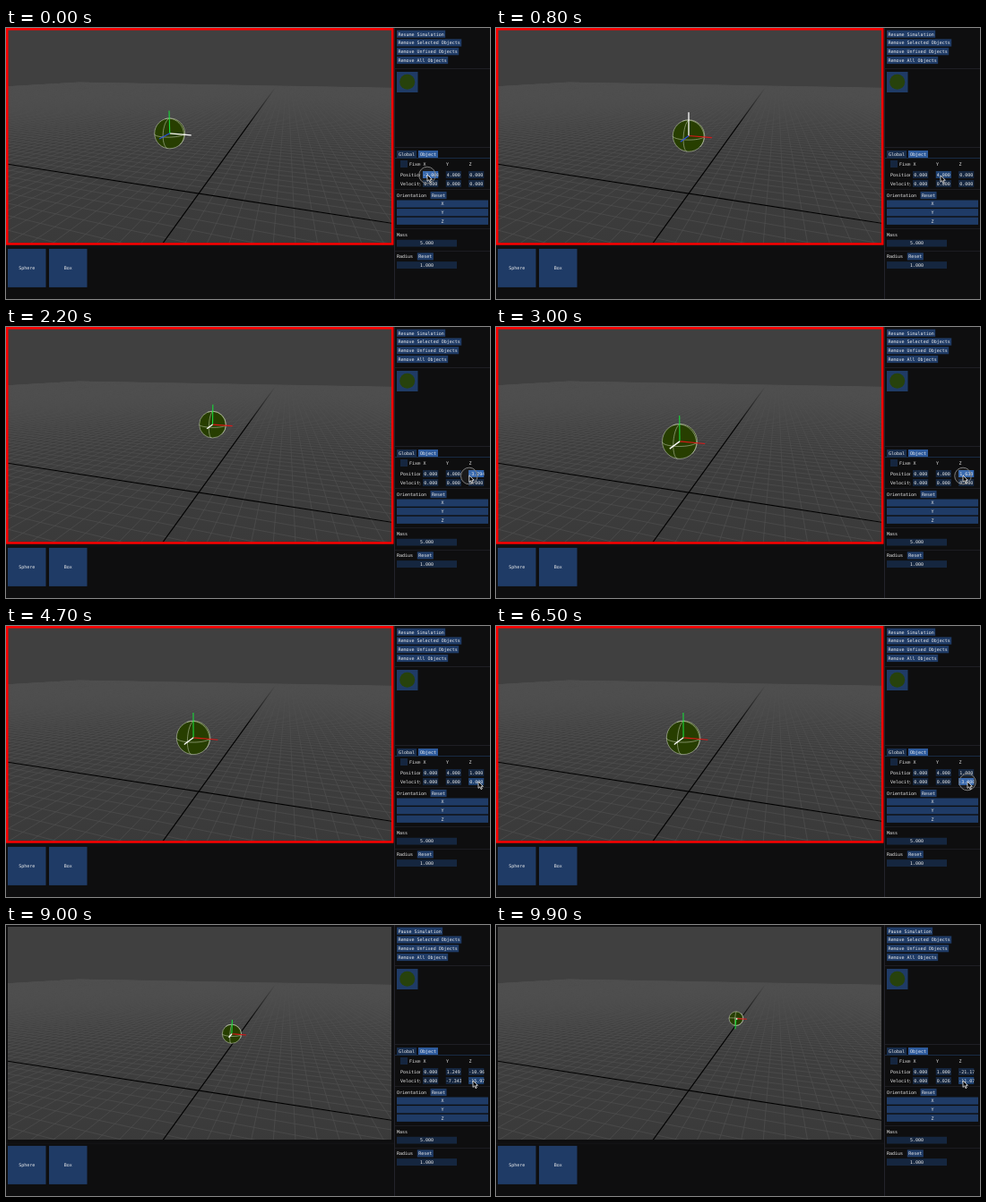
An HTML page that plays this animation: 540 by 303 pixels, repeating every 10 s.

```html
<!DOCTYPE html>
<html lang="en">
<head>
<meta charset="utf-8">
<title>Physics sandbox</title>
<style>
  html, body { margin: 0; width: 100%; height: 100%; overflow: hidden; background: #0e0e0f; }
  svg { display: block; }
  #stage { width: 100vw; height: 100vh; }
  text { font: 5px "DejaVu Sans Mono", monospace; fill: #ececec; white-space: pre; }
</style>
</head>
<body>
<svg id="stage" viewBox="0 0 540 303">
  <defs>
    <linearGradient id="floor" x1="0" y1="0" x2="0" y2="1">
      <stop offset="0" stop-color="#414141"/><stop offset="1" stop-color="#383838"/>
    </linearGradient>
    <linearGradient id="axisFade" gradientUnits="userSpaceOnUse" x1="0" y1="66" x2="0" y2="110">
      <stop offset="0" stop-color="#000" stop-opacity="0"/><stop offset="1" stop-color="#000"/>
    </linearGradient>
    <clipPath id="view"><rect x="2" y="2" width="428" height="238"/></clipPath>
  </defs>
  <g id="scene" clip-path="url(#view)"></g>
  <g id="panels"></g>
  <g id="pointer"></g>
</svg>
<script>
const NS = 'http://www.w3.org/2000/svg';
const $ = id => document.getElementById(id);
const scene = $('scene'), panels = $('panels'), pointer = $('pointer');

function add(parent, tag, attrs, content) {
  const el = document.createElementNS(NS, tag);
  set(el, attrs);
  if (content !== undefined) el.textContent = content;
  parent.appendChild(el);
  return el;
}
function set(el, attrs) {
  for (const k in attrs) el.setAttribute(k, attrs[k]);
}

// Camera at (5, 8, 15) looking at (0, 4, 0), 45 degree field of view
const EYE = [5, 8, 15], FOCAL = 288, CX = 215, CY = 120.5;
const dot = (a, b) => a[0] * b[0] + a[1] * b[1] + a[2] * b[2];
const sub = (a, b) => a.map((v, i) => v - b[i]);
const mix = (a, b, k) => a.map((v, i) => v + (b[i] - v) * k);
const unit = a => a.map(v => v / Math.hypot(...a));
const cross = (a, b) => [a[1] * b[2] - a[2] * b[1], a[2] * b[0] - a[0] * b[2], a[0] * b[1] - a[1] * b[0]];
const FWD = unit(sub([0, 4, 0], EYE));
const RIGHT = unit(cross(FWD, [0, 1, 0]));
const UP = cross(RIGHT, FWD);
const depth = p => dot(sub(p, EYE), FWD);

function project(p) {
  const q = sub(p, EYE), s = FOCAL / dot(q, FWD);
  return [CX + dot(q, RIGHT) * s, CY - dot(q, UP) * s];
}
const xy = p => project(p).map(v => v.toFixed(2)).join(' ');

function linePath(a, b) {
  const near = 1, da = depth(a), db = depth(b);
  if (da < near && db < near) return '';
  if (da < near) a = mix(a, b, (near - da) / (db - da));
  if (db < near) b = mix(b, a, (near - db) / (da - db));
  return `M${xy(a)}L${xy(b)}`;
}

// Static ground
const HALF = 130;
add(scene, 'rect', { width: 432, height: 242, fill: '#404040' });
add(scene, 'path', {
  d: `M${xy([-HALF, 0, -HALF])}L${xy([HALF, 0, -HALF])}L540 303L-200 303L${xy([-HALF, 0, -20])}Z`,
  fill: 'url(#floor)'
});
let grid = '';
for (let i = -HALF; i <= HALF; i++) {
  grid += linePath([i, 0, -HALF], [i, 0, HALF]) + linePath([-HALF, 0, i], [HALF, 0, i]);
}
add(scene, 'path', { d: grid, stroke: '#505050', 'stroke-width': 0.7, fill: 'none' });
add(scene, 'path', { d: linePath([-HALF, 0, 0], [HALF, 0, 0]), stroke: '#000', 'stroke-width': 1.2 });
add(scene, 'path', { d: linePath([0, 0, -HALF], [0, 0, HALF]), stroke: 'url(#axisFade)', 'stroke-width': 1.2 });

// Ball with wire rings and axis gizmo
const WIRE = { stroke: '#d0d6c0', 'stroke-width': 0.7, 'stroke-opacity': 0.75 };
const ball = add(scene, 'circle', { fill: '#273e00', ...WIRE });
const rings = add(scene, 'path', { fill: 'none', ...WIRE });
const AXIS_COLORS = ['#d81818', '#18d838', '#2a50e0'];
const axes = AXIS_COLORS.map(() => add(scene, 'path', { fill: 'none' }));

function drawBall(pos, spin, selected) {
  const q = sub(pos, EYE), [x, y] = project(pos);
  set(ball, { cx: x, cy: y, r: FOCAL / Math.sqrt(dot(q, q) - 1) });
  const c = Math.cos(spin), s = Math.sin(spin);
  const basis = [[1, 0, 0], [0, c, -s], [0, s, c]];
  let d = '';
  for (let i = 0; i < 3; i++) {
    const u = basis[i], v = basis[(i + 1) % 3];
    let drawing = false;
    for (let k = 0; k <= 60; k++) {
      const a = k * Math.PI / 30;
      const n = u.map((w, j) => w * Math.cos(a) + v[j] * Math.sin(a));
      const p = n.map((w, j) => w + pos[j]);
      const front = dot(n, sub(EYE, p)) > 0;
      if (front) d += (drawing ? 'L' : 'M') + xy(p);
      drawing = front;
    }
  }
  rings.setAttribute('d', d);
  axes.forEach((el, i) => set(el, {
    d: linePath(pos, pos.map((w, j) => w + 1.5 * basis[i][j])),
    stroke: i === selected ? '#fff' : AXIS_COLORS[i],
    'stroke-width': i === selected ? 1.3 : 1.1
  }));
}

// Interface
const BUTTON = '#1f3b66', FIELD = '#15263f', HOVER = '#1f4272', ACTIVE = '#2f62ab', RULE = '#2a2a32';
const CHAR = 3.01;
const buttonWidth = s => s.length * CHAR + 3;
const box = (x, y, w, h, fill) => add(panels, 'rect', { x, y, width: w, height: h, fill });
const label = (x, y, s) => add(panels, 'text', { x, y: y + 1.8 }, s);
function button(x, mid, s, w = buttonWidth(s), h = 8.2, fill = BUTTON) {
  const rect = box(x, mid - h / 2, w, h, fill);
  const text = label(x + (w - s.length * CHAR) / 2, mid, s);
  return { rect, text };
}
function field(x, mid, w = 17.5) {
  const cell = add(panels, 'svg', { x, y: mid - 4.1, width: w, height: 8.2 });
  const rect = add(cell, 'rect', { width: w, height: 8.2, fill: FIELD });
  const text = add(cell, 'text', { y: 5.9 });
  return (value, fill = FIELD) => {
    const s = value.toFixed(3).replace(/^-(0\.000)$/, '$1');
    text.textContent = s;
    text.setAttribute('x', Math.max(0.3, (w - s.length * CHAR) / 2));
    rect.setAttribute('fill', fill);
  };
}
function clippedLabel(x, mid, w, s) {
  const cell = add(panels, 'svg', { x, y: mid - 4, width: w, height: 8 });
  add(cell, 'text', { y: 5.8 }, s);
}

const border = add(panels, 'rect', {
  x: 1.25, y: 1.25, width: 430, height: 240.2, fill: 'none', stroke: '#f00', 'stroke-width': 2.5
});
box(433, 0, 0.8, 303, RULE);
box(0, 243.8, 433, 0.5, '#1c1c21');
box(434, 45, 106, 0.6, RULE);
box(434, 133, 106, 0.6, RULE);

const toggle = button(436, 6.7, 'Resume Simulation');
button(436, 16.5, 'Remove Selected Objects');
button(436, 26.2, 'Remove Unfixed Objects');
button(436, 36, 'Remove All Objects');
box(436, 49, 23.5, 23, BUTTON);
add(panels, 'circle', { cx: 447.7, cy: 60.3, r: 8.5, fill: '#27420c' });

button(436, 141, 'Global', 22, 8, '#182d4c');
button(460, 141, 'Object', 22, 8, '#2d5a9c');
box(434, 145, 106, 0.5, '#234878');
box(440, 148, 8, 8, FIELD);
clippedLabel(450, 152.5, 12.3, 'Fixed');
clippedLabel(440, 164, 22.2, 'Position');
clippedLabel(440, 173.8, 22.2, 'Velocity');
const COLS = [465, 490.5, 516];
COLS.forEach((x, i) => label(x + 0.5, 152.5, 'XYZ'[i]));
const posFields = COLS.map(x => field(x, 164));
const velFields = COLS.map(x => field(x, 173.8));

box(434, 180.5, 106, 0.5, RULE);
label(436, 187, 'Orientation');
button(473.5, 187, 'Reset');
['X', 'Y', 'Z'].forEach((s, i) => button(436, 196.6 + i * 9.6, s, 102));
box(434, 224.5, 106, 0.5, RULE);
label(436, 231, 'Mass');
field(436, 240.6, 67)(5);
box(434, 249, 106, 0.5, RULE);
label(436, 255.4, 'Radius');
button(458.8, 255.4, 'Reset');
field(436, 265.2, 67)(1);
button(2, 268.4, 'Sphere', 42.5, 43);
button(48, 268.4, 'Box', 42.5, 43);

const press = add(pointer, 'circle', {
  r: 9.3, fill: '#fff', 'fill-opacity': 0.05, stroke: '#7c7c7c', 'stroke-width': 1
});
const arrow = add(pointer, 'path', {
  d: 'M0 0V7.4L1.8 5.8L3 8.6L4.3 8L3.1 5.3H5.4Z', fill: '#000', stroke: '#f0f0f0', 'stroke-width': 0.8
});

// Timeline
function track(t, keys) {
  if (t <= keys[0][0]) return keys[0][1];
  for (let i = 1; i < keys.length; i++) {
    const [t1, v1] = keys[i], [t0, v0] = keys[i - 1];
    if (t < t1) {
      const k = (t - t0) / (t1 - t0);
      return v0 + (v1 - v0) * k * k * (3 - 2 * k);
    }
  }
  return keys[keys.length - 1][1];
}
const POS_X = [[0, -2], [600, 0]];
const POS_Z = [[1000, 0], [1550, -7.7], [2900, 1.63], [3000, 1.63], [3700, 1]];
const VEL_Z = [[5800, 0], [6500, -3], [7300, -16]];
const TIP_X = [[0, 470], [600, 472], [1000, 520], [1550, 513], [2900, 521], [3000, 521],
  [3700, 520.5], [4000, 520.5], [4700, 527], [5800, 528], [6500, 526], [7300, 518], [7500, 518], [8000, 521]];
const TIP_Y = [[0, 164], [1000, 165], [1500, 166], [4000, 166], [4700, 174]];
const START = 8250.7, GRAVITY = 9.8, LAUNCH = 15.97;
const FALL = Math.sqrt(6 / GRAVITY);

function simulate(t) {
  const pos = [track(t, POS_X), 4, track(t, POS_Z)];
  const vel = [0, 0, track(t, VEL_Z)];
  let spin = 0;
  if (t >= START) {
    const s = (t - START) / 1000, air = Math.min(s, FALL), roll = Math.max(0, s - FALL);
    const rolled = 11.25 * roll - 0.1 * roll * roll;
    pos[1] = 4 - GRAVITY * air * air / 2;
    pos[2] = 1 - LAUNCH * air - rolled;
    vel[1] = roll ? 0.026 : -GRAVITY * air;
    vel[2] = roll ? -11.25 + 0.2 * roll : -LAUNCH;
    spin = rolled;
  }
  return { pos, vel, spin };
}

function render(t) {
  const { pos, vel, spin } = simulate(t);
  const running = t >= START;
  const column = t < 700 ? 0 : t < 900 ? 1 : 2;
  const onVelocity = t >= 4400;
  const pressed = t < 700 || (t >= 1000 && t < 3900) || (t >= 5800 && t < 7500);
  drawBall(pos, spin, column);
  for (let i = 0; i < 3; i++) {
    const lit = i === column ? (pressed ? ACTIVE : HOVER) : FIELD;
    posFields[i](pos[i], onVelocity ? FIELD : lit);
    velFields[i](vel[i], onVelocity ? lit : FIELD);
  }
  const caption = running ? 'Pause Simulation' : 'Resume Simulation';
  toggle.text.textContent = caption;
  toggle.rect.setAttribute('width', buttonWidth(caption));
  border.style.display = running ? 'none' : '';
  const x = track(t, TIP_X), y = track(t, TIP_Y);
  set(press, { cx: x, cy: y + 0.5, visibility: pressed ? 'visible' : 'hidden' });
  arrow.setAttribute('transform', `translate(${x} ${y})`);
}

const begin = performance.now();
function frame() {
  const t = (performance.now() - begin) % 10000;
  render(Math.floor(t / 100) * 100);
  requestAnimationFrame(frame);
}
frame();
</script>
</body>
</html>
```
